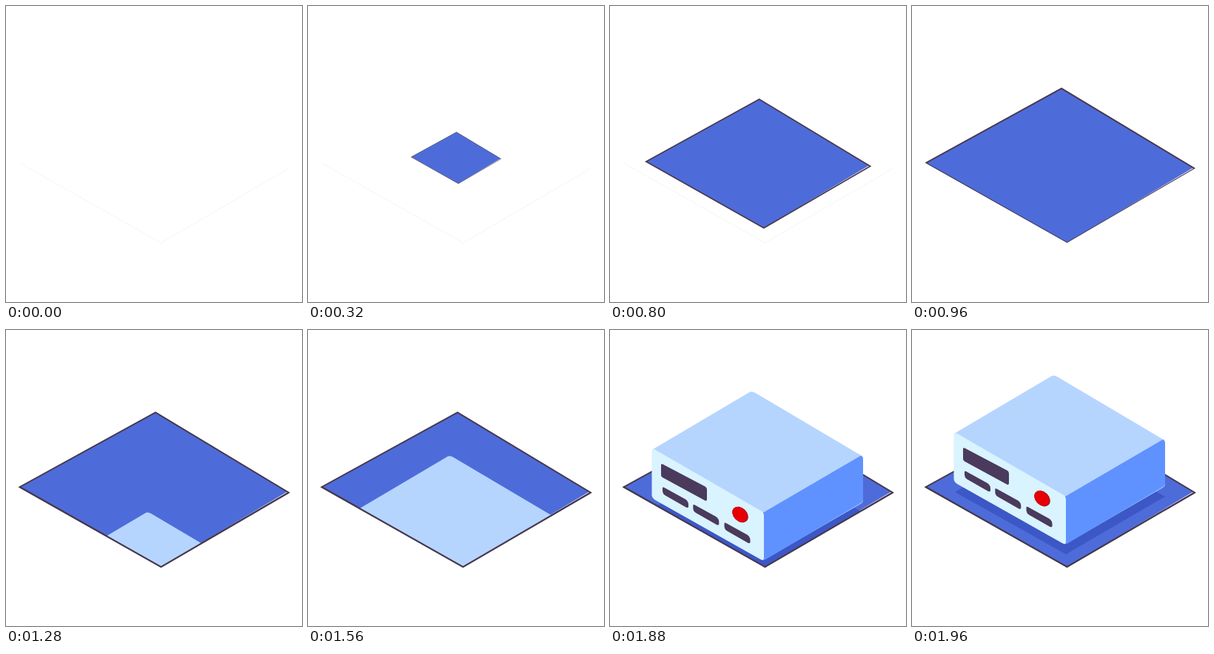
An HTML page for the animation above (2680 ms loop, 400x400 px).

```html
<!DOCTYPE html>
<html lang="en">
<head>
<meta charset="utf-8">
<title>Rising box</title>
<style>
  html, body { margin: 0; width: 100%; height: 100%; overflow: hidden; background: #fff; }
  svg { display: block; width: 100vw; height: 100vh; }
</style>
</head>
<body>
<svg viewBox="0 0 400 400">
  <defs>
    <clipPath id="above"><path d="M0 -100H400V209.5L382 219.7L209.5 320L18.5 212.2L0 201.8Z"/></clipPath>
    <path id="slot" d="M71 192Q71 190 73 191L102 207Q106 210 106 214V217Q106 219 103 218L75 202Q71 200 71 195Z"/>
  </defs>

  <path d="M18.5 212.2L209.5 320L382 219.7" fill="none" stroke="#f1f1f1" stroke-width=".8"/>

  <g id="floorClip">
    <g id="floor">
      <path d="M202 111.3L380.5 218.3L209.5 320L18.5 212.2Z" fill="#4d6cd9"/>
      <path d="M202 111.3L382 219.7L209.5 320L18.5 212.2Z" fill="none" stroke="#47384f" stroke-width="2"/>
    </g>
  </g>

  <g clip-path="url(#above)">
    <g id="box">
      <path d="M58 219L192 143L342 225L208 303Z" fill="#3c57c6"/>
      <path d="M57 140L189 62Q192 60.5 196 63L338 147Q342 149 342 153V208Q342 211 339 213L208 289L150 200Z" fill="#b5d5ff"/>
      <path d="M207 225L339 148Q342 149 342 153V207Q342 210 339 212L210 288.5L206 289Z" fill="#5f92ff"/>
      <path d="M56.5 143Q56.5 137.500 61 140L204 222.500Q208 225 208 229V286Q208 291 203 288L61 208Q56.500 205 56.500 201Z" fill="#d9f3ff"/>
      <path d="M69 161Q69 158 72 160L129 190Q131 191.500 131 194V207Q131 210 128 208.500L71 177.500Q69 176.500 69 174Z" fill="#4a3a5c"/>
      <g fill="#4a3a5c">
        <use href="#slot"/>
        <use href="#slot" x="41.3" y="23.5"/>
        <use href="#slot" x="83.5" y="48"/>
      </g>
      <g transform="translate(176 227.700) rotate(45)">
        <ellipse rx="12.2" ry="9" fill="#8c0a1c"/>
        <ellipse cx="-.5" cy=".2" rx="11.600" ry="8.600" fill="#e60005"/>
      </g>
    </g>
  </g>

  <path id="rim" d="M18.5 212.2L209.5 320L382 219.7" fill="none" stroke="#47384f" stroke-width="2"/>
</svg>
<script>
  const LOOP = 2680, STEP = 40;
  const GROW_END = 960, RIM_START = 1040, RISE_END = 1960;
  const RISE_SPEED = 0.272; // px per ms
  const byId = id => document.getElementById(id);
  const floorClip = byId('floorClip'), floor = byId('floor'), box = byId('box'), rim = byId('rim');

  function draw(time) {
    const t = Math.floor((time % LOOP) / STEP) * STEP;
    const scale = Math.min(1, t / GROW_END);
    const sink = Math.max(0, RISE_END - t) * RISE_SPEED;
    const settled = t >= RIM_START;

    floor.setAttribute('transform', `translate(200 200) scale(${scale}) translate(-200 -200)`);
    floor.style.display = scale > 0 ? '' : 'none';
    floorClip.setAttribute('clip-path', settled ? 'none' : 'url(#above)');

    box.setAttribute('transform', `translate(0 ${sink})`);
    box.style.display = rim.style.display = settled ? '' : 'none';
  }

  const start = performance.now();
  function tick() {
    draw(performance.now() - start);
    requestAnimationFrame(tick);
  }
  draw(0);
  requestAnimationFrame(tick);
</script>
</body>
</html>
```
